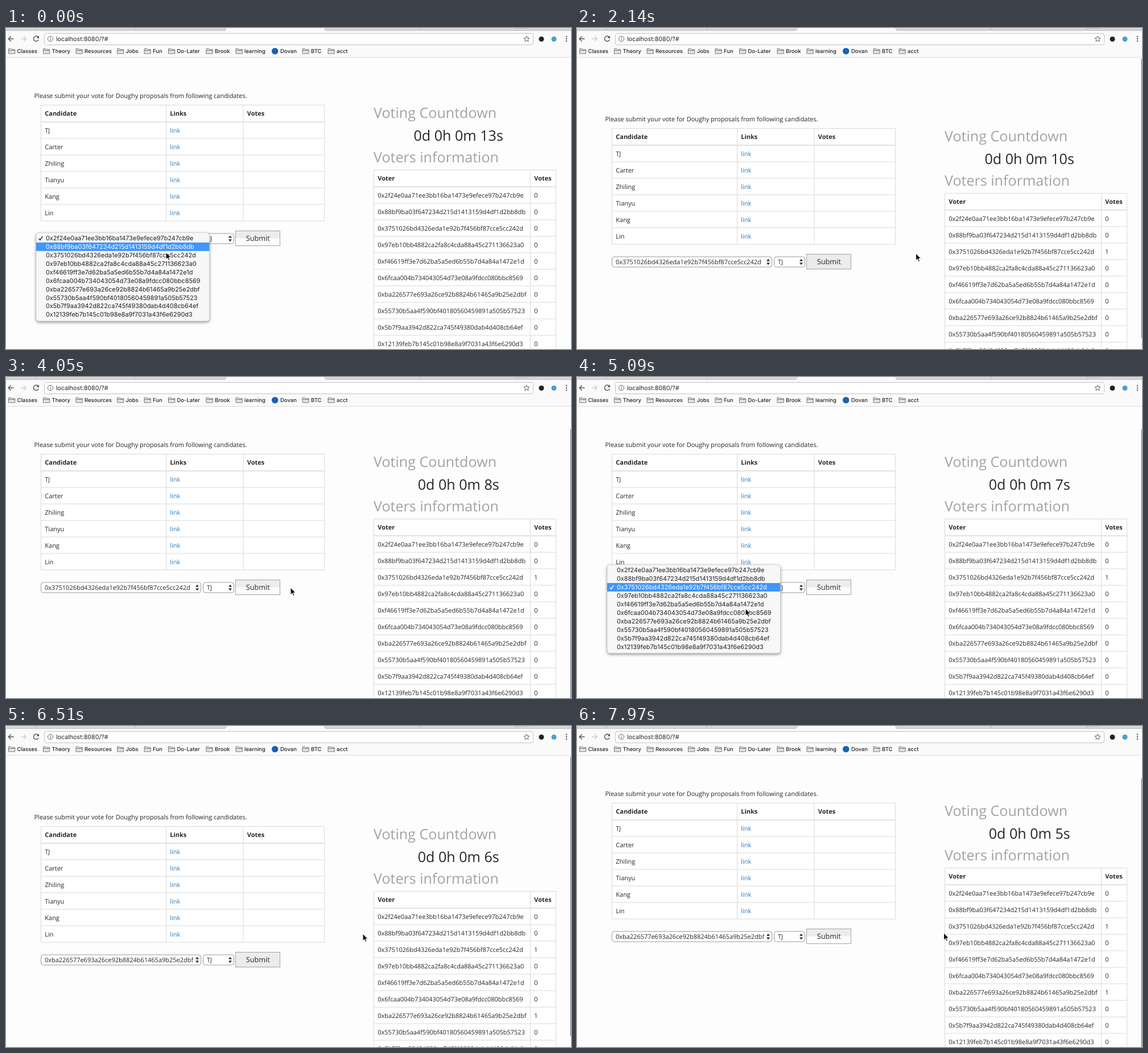
These frames come from a looping animation (993x564 px, 8000 ms). An HTML page:

```html
<!DOCTYPE html>
<html lang="en">
<head>
<meta charset="utf-8">
<title>Voting page</title>
<style>
html, body { margin: 0; width: 100%; height: 100%; overflow: hidden; background: #fdfdfd; }
svg { display: block; width: 993px; height: 564px; }
text { font: 10.98px "Open Sans", sans-serif; fill: #262626; white-space: pre; text-rendering: geometricPrecision; }
.bold { font-weight: 700; }
.link { fill: #337ab7; }
.head { font-size: 25.1px; fill: #a3a3a3; }
.clock { font-size: 25.1px; text-anchor: middle; }
.button { font-size: 12.7px; }
.ui { font: 10.7px Inter, sans-serif; fill: #222; }
.item { font: 10.88px Inter, sans-serif; }
.mark { font: 500 9.5px Inter, sans-serif; fill: #222; }
.popup { filter: drop-shadow(0 2px 2.5px rgba(0,0,0,.4)); }
</style>
</head>
<body>
<svg id="stage" viewBox="0 0 993 564"></svg>
<script>
const NS = 'http://www.w3.org/2000/svg';
const LOOP = 8000, TOP = 41, PITCH = 14.9;

const voters = [
  '0x2f24e0aa71ee3bb16ba1473e9efece97b247cb9e',
  '0x88bf9ba03f647234d215d1413159d4df1d2bb8db',
  '0x3751026bd4326eda1e92b7f456bf87cce5cc242d',
  '0x97eb10bb4882ca2fa8c4cda88a45c271136623a0',
  '0xf46619ff3e7d62ba5a5ed6b55b7d4a84a1472e1d',
  '0x6fcaa004b734043054d73e08a9fdcc080bbc8569',
  '0xba226577e693a26ce92b8824b61465a9b25e2dbf',
  '0x55730b5aa4f590bf40180560459891a505b57523',
  '0x5b7f9aa3942d822ca745f49380dab4d408cb64ef',
  '0x12139feb7b145c01b98e8a9f7031a43f6e6290d3'
];
const candidates = ['TJ', 'Carter', 'Zhiling', 'Tianyu', 'Kang', 'Lin'];

// Each track is a list of [time, value...] steps, held until the next one.
const clockTrack = [[0, 13], [150, 12], [1230, 11], [2140, 10], [3130, 9], [4050, 8], [5090, 7], [6050, 6], [7130, 5]];
const scrollTrack = [[0, 41], [1230, 0], [2440, 12], [2590, 36], [2770, 41], [6050, 0],
  [7130, 22], [7280, 43.5], [7430, 43], [7580, 42], [7730, 41.5], [7970, 41]];
const barTrack = [[0, 0], [1230, 1], [5540, 0], [6050, 1]];
const ringTrack = [[0, 0], [480, 1], [1230, 0], [5540, 1], [6050, 0]];
const pickTrack = [[0, 0], [480, 2], [5540, 6]];
// Highlighted row of the open list, -1 when closed.
const listTrack = [[0, 1], [150, 2], [480, -1], [5090, 2], [5240, 6], [5540, -1]];
const voteTimes = { 2: 1680, 6: 6350 };
const mouseTrack = [
  [0, 281, 394, 'arrow'], [480, 290, 393, 'arrow'], [630, 345, 386, 'arrow'], [780, 405, 376, 'hand'], [930, 427, 374, 'hand'],
  [1530, 440, 378, 'hand'], [1680, 490, 385, 'arrow'], [1830, 550, 392, 'arrow'], [1980, 586, 395, 'arrow'], [2140, 595.5, 396, 'arrow'],
  [2770, 740, 374, 'beam'], [2950, 873, 358, 'beam'], [3130, 868, 359, 'beam'], [3280, 860, 360, 'beam'], [3450, 848, 361, 'beam'],
  [3600, 770, 364, 'beam'], [3750, 690, 366, 'beam'], [3900, 600, 368, 'arrow'], [4050, 500, 370, 'arrow'],
  [4200, 425, 372, 'hand'], [4340, 360, 373, 'arrow'], [4490, 322, 373, 'arrow'], [4640, 305, 374, 'arrow'],
  [5090, 296, 407, 'arrow'], [5240, 298, 425, 'arrow'], [5540, 330, 406, 'arrow'], [5690, 395, 384, 'arrow'], [5840, 427, 374, 'hand'],
  [6200, 500, 370, 'arrow'], [6350, 590, 367, 'arrow'], [6510, 627, 365, 'arrow'], [6690, 638, 365, 'arrow'], [6830, 644.5, 363.7, 'arrow']
];

const at = (track, t) => track.reduce((held, step) => step[0] <= t ? step : held);

function add(parent, tag, attrs) {
  const node = document.createElementNS(NS, tag);
  for (const key in attrs) node.setAttribute(key, attrs[key]);
  return parent.appendChild(node);
}
const group = (parent, attrs) => add(parent, 'g', attrs);
const rect = (g, x, y, width, height, fill, more) => add(g, 'rect', { x, y, width, height, fill, ...more });
const path = (g, d, stroke, width = 1, fill = 'none') =>
  add(g, 'path', { d, stroke, fill, 'stroke-width': width });
const dot = (g, cx, cy, r, fill, more) => add(g, 'circle', { cx, cy, r, fill, ...more });
function label(g, x, y, string, kind = '') {
  const node = add(g, 'text', { x, y, class: kind });
  node.textContent = string;
  return node;
}
const show = (node, on) => node.setAttribute('visibility', on ? 'visible' : 'hidden');
const move = (node, x, y) => node.setAttribute('transform', `translate(${x} ${y})`);

function table(g, cols, top, heads, rows) {
  const left = cols[0], right = cols[cols.length - 1], first = top + 29.5;
  const bottom = first + 29 * rows.length;
  rect(g, left, top, right - left, bottom - top, '#fff');
  for (const x of cols) path(g, `M${x} ${top}V${bottom}`, '#d9d9d9');
  path(g, `M${left} ${top}H${right}`, '#d9d9d9');
  path(g, `M${left} ${first}H${right}`, '#d9d9d9', 1.6);
  heads.forEach((text, i) => label(g, cols[i] + 6.8, top + 18.4, text, 'bold'));
  return rows.map((row, r) => {
    const y = first + 29 * r;
    path(g, `M${left} ${y + 29}H${right}`, '#d9d9d9');
    return row.map((text, i) => label(g, cols[i] + 6.8, y + 18.8, text, text === 'link' ? 'link' : ''));
  });
}

function selectBox(g, x, width, text) {
  rect(g, x, 361, width, 18, '#fff', { rx: 4, stroke: '#999' });
  const a = x + width - 6.5;
  path(g, `M${a - 3} 368.7L${a} 364.6L${a + 3} 368.7ZM${a - 3} 371.3L${a} 375.4L${a + 3} 371.3Z`, 'none', 0, '#333');
  return label(g, x + 6.5, 374, text);
}

const stage = document.getElementById('stage');
rect(stage, 0, 0, 993, 564, '#fdfdfd');

// Page
const page = group(stage);
label(page, 49.5, 123, 'Please submit your vote for Doughy proposals from following candidates.');
table(page, [61.5, 281.5, 417, 559.5], 135.5, ['Candidate', 'Links', 'Votes'], candidates.map(name => [name, 'link', '']));
label(page, 646, 158, 'Voting Countdown', 'head');
const clock = label(page, 795.2, 197.6, '', 'clock');
label(page, 646, 236.4, 'Voters information', 'head');
const votes = table(page, [646.5, 921.5, 966.5], 249.5, ['Voter', 'Votes'], voters.map(id => [id, '0'])).map(row => row[1]);
const ring = rect(page, 60.5, 360, 283, 20, 'none', { rx: 5, stroke: '#74b2f0', 'stroke-width': 2.4 });
const picked = selectBox(page, 61.5, 281, '');
selectBox(page, 346.5, 54, 'TJ');
rect(page, 403.5, 356.5, 78, 26, '#ececec', { stroke: '#a3a3a3' });
const shine = rect(page, 404, 369.5, 77, 12.5, '#fcfcfc');
label(page, 421.7, 374, 'Submit', 'button');

const bar = rect(stage, 992, 54, 1, 491, '#6a6a6a');

// Browser chrome
const chrome = group(stage);
rect(chrome, 0, 0, 993, 51.5, '#fafafa');
rect(chrome, 0, 0, 386, 4, '#d8d8d8');
rect(chrome, 561, 0, 432, 4, '#d8d8d8');
path(chrome, 'M0 4.3H385L387.5 0M559.5 0L562 4.3H993', '#b5b5b5');
path(chrome, 'M51 0L53 4M227 0L229 4M727 0L729 4M895 0L898 4', '#b5b5b5');
rect(chrome, 897, 0, 22, 1.5, '#c9c9c9', { rx: 1 });
path(chrome, 'M0 51.5H993', '#dcdcdc');
rect(chrome, 67.5, 9.5, 859, 20, '#fff', { rx: 3, stroke: '#c2c2c2' });
path(chrome, 'M13.5 19H4.5M8.7 14.5L4.2 19L8.7 23.5', '#555', 1.4);
path(chrome, 'M26 19H35M30.8 14.5L35.3 19L30.8 23.5', '#cfcfcf', 1.4);
path(chrome, 'M56.6 16.1A4.5 4.5 0 1 0 57.2 20.4', '#555', 1.4);
path(chrome, 'M58 13.6V18H53.6Z', 'none', 0, '#555');
dot(chrome, 78, 19, 4.6, 'none', { stroke: '#666' });
path(chrome, 'M78 18.2V21.8M78 16V17.2', '#666', 1.1);
label(chrome, 88, 22.9, 'localhost:8080/?#', 'ui');
const star = Array.from({ length: 10 }, (_, i) => {
  const r = i % 2 ? 2.3 : 5.3, a = i * Math.PI / 5;
  return `${915 + r * Math.sin(a)} ${19.4 - r * Math.cos(a)}`;
});
path(chrome, `M${star.join('L')}Z`, '#666');
dot(chrome, 941, 19.5, 4.5, '#222');
dot(chrome, 963, 19.5, 4.5, '#4d9fc8');
for (const y of [15, 19, 23]) dot(chrome, 985, y, 1.2, '#555');

const marks = [['Classes', 19.5], ['Theory', 80.5], ['Resources', 138], ['Jobs', 210.5], ['Fun', 258], ['Do-Later', 300.5],
  ['Brook', 367], ['learning', 419], ['Dovan', 482], ['BTC', 536], ['acct', 581]];
for (const [name, x] of marks) {
  label(chrome, x, 44, name, 'mark');
  if (name === 'Dovan') dot(chrome, 472.7, 40.6, 5.7, '#1763b4');
  else path(chrome, `M${x - 15} 45V36.5H${x - 10.5}L${x - 9.5} 37.8H${x - 3.8}V45ZM${x - 15} 39.5H${x - 3.8}`, '#777', 1, '#e4e4e4');
}

// Open list
const popup = group(stage);
rect(popup, 53, 0, 304.5, 155.5, '#f7f7f7', { rx: 5, stroke: '#c4c4c4', 'stroke-width': .7, class: 'popup' });
const glow = rect(popup, 53, 0, 304.5, PITCH, '#4096fb');
const items = voters.map((id, i) => label(popup, 70, 13.7 + PITCH * i, id, 'item'));
const tick = path(popup, 'M57.7 10.3L60 13L64.2 6.5', '#222', 1.5);

// Pointers
const pointers = {};
for (const kind of ['arrow', 'hand', 'beam']) pointers[kind] = group(stage);
path(pointers.arrow, 'M0 0V12.6L2.9 9.9L4.9 14.4L7 13.5L5.1 9.1H9.1Z', '#fff', 1, '#111');
path(pointers.hand, 'M-2 1V-5.2Q-2 -6.6 -.8 -6.6T.4 -5.2V-1.3Q1.8 -2 2.5 -.7Q4 -1 4.4 .2Q6.1 -.1 6.1 1.6V4Q6.1 5.5 5 7.2V8.3H-1.5Q-2.2 6.3 -4.6 3.2Q-5.6 1.2 -4.2 .6Q-3.2 .2 -2 2.2', '#111', 1.1, '#fff');
path(pointers.hand, 'M.6 3.2V6M2.3 3.2V6M4 3.2V6', '#111', .7);
path(pointers.beam, 'M-2.6 -6Q-.3 -6 0 -4.6Q.3 -6 2.6 -6M0 -4.6V4.6M-2.6 6Q-.3 6 0 4.6Q.3 6 2.6 6M-1.4 2H1.4', '#222', 1);

function draw(t) {
  const scroll = at(scrollTrack, t)[1];
  move(page, 0, TOP - scroll);
  clock.textContent = `0d 0h 0m ${at(clockTrack, t)[1]}s`;
  votes.forEach((node, i) => node.textContent = t >= voteTimes[i] ? '1' : '0');
  show(shine, scroll > 20);
  show(ring, at(ringTrack, t)[1]);
  show(bar, at(barTrack, t)[1]);
  bar.setAttribute('y', 54 + scroll * .927);

  const pick = at(pickTrack, t)[1], lit = at(listTrack, t)[1];
  picked.textContent = voters[pick];
  show(popup, lit >= 0);
  move(popup, 0, 359.6 - PITCH * pick);
  glow.setAttribute('y', 2.4 + PITCH * lit);
  items.forEach((node, i) => node.style.fill = i === lit ? '#fff' : '#222');
  move(tick, 0, PITCH * pick);
  tick.setAttribute('stroke', lit === pick ? '#fff' : '#222');

  const [, x, y, shape] = at(mouseTrack, t);
  for (const kind in pointers) {
    show(pointers[kind], kind === shape);
    move(pointers[kind], x, y);
  }
}

const start = performance.now();
function tickFrame() {
  draw((performance.now() - start) % LOOP);
  requestAnimationFrame(tickFrame);
}
tickFrame();
</script>
</body>
</html>
```
